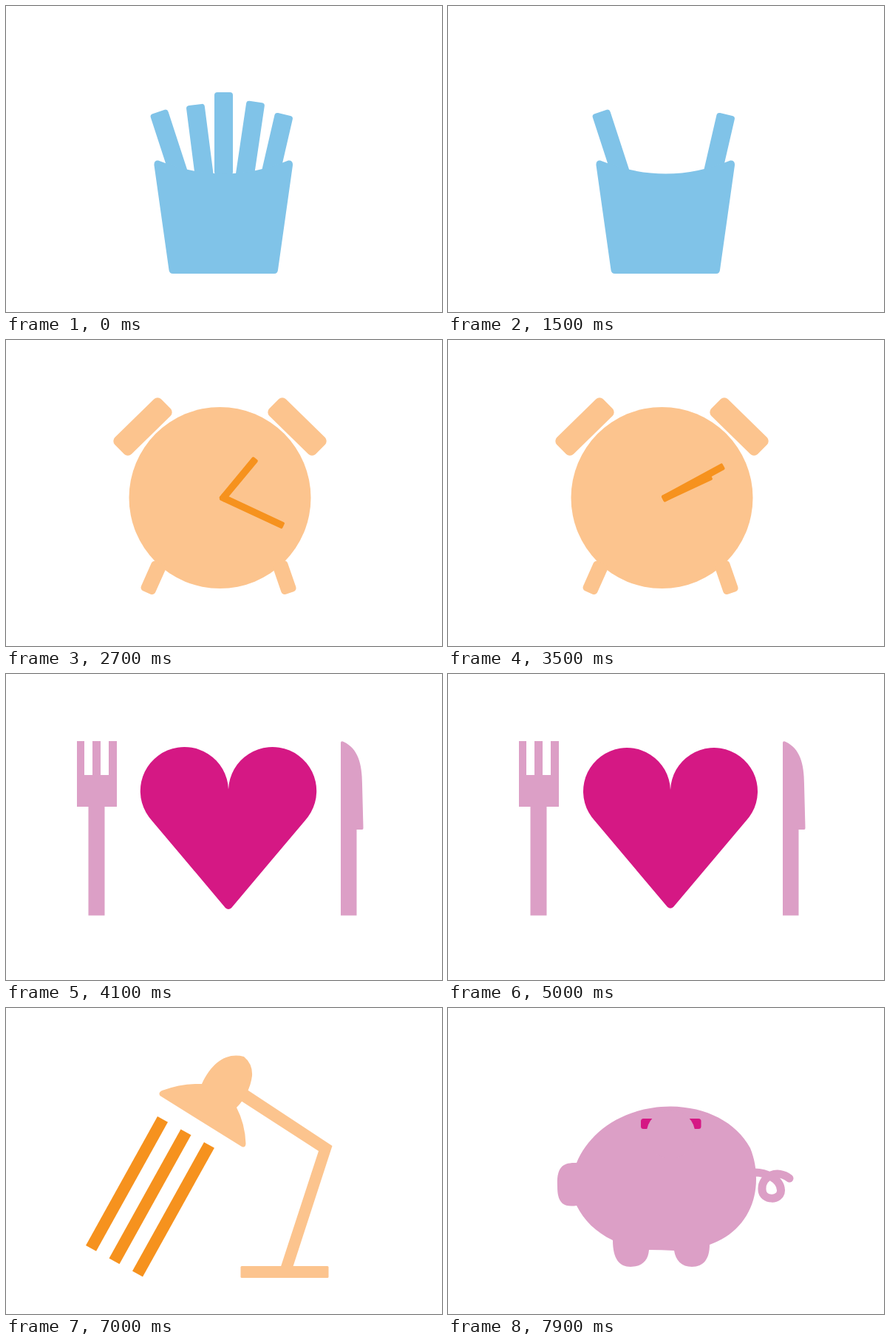
These frames come from a looping animation (590 by 415 pixels, 8000 ms). An HTML page:

```html
<!DOCTYPE html>
<html lang="en">
<head>
<meta charset="utf-8">
<title>Icons</title>
<style>
  html, body { margin: 0; width: 100%; height: 100%; overflow: hidden; background: #fff; }
  svg { display: block; width: 100%; height: 100%; }
  .blue { fill: #80c3e8; }
  .peach { fill: #fcc48e; }
  .orange { fill: #f6921e; }
  .pink { fill: #dc9fc6; }
  .magenta { fill: #d51884; }
</style>
</head>
<body>
<svg viewBox="0 0 590 415">
  <g id="fries" class="blue">
    <g id="sticks"></g>
    <path d="M200.5 216Q200 209 206 209.500Q295 245.500 382 209.500Q388.500 209 388 216L368 358Q367.500 363 363 363H226Q221 363 220.500 358Z"/>
  </g>

  <g id="clock" class="peach">
    <circle cx="289.500" cy="214" r="123"/>
    <rect x="-44" y="-16" width="88" height="32" rx="7" transform="translate(185 117.500) rotate(-44.500)"/>
    <rect x="-44" y="-16" width="88" height="32" rx="7" transform="translate(394 117.500) rotate(44.500)"/>
    <rect x="-10.500" y="-44" width="21" height="44" rx="5" transform="translate(190.500 342.500) rotate(24)"/>
    <rect x="-10.500" y="-44" width="21" height="44" rx="5" transform="translate(384 343) rotate(-19)"/>
    <rect id="hour" class="orange" x="-4.750" y="-69" width="9.500" height="73" rx="2"/>
    <rect id="minute" class="orange" x="-4.750" y="-90" width="9.500" height="94" rx="2"/>
  </g>

  <g id="meal" class="pink">
    <path d="M96 91H106V137H117V91H128V137H139V91H150V180H133.500V327.500H111.500V180H96Z"/>
    <path d="M453 93Q453.500 90 457 92C476 101 482 121 482 150L483.500 209Q483.500 211 482 211H474.500V327.500H453Z"/>
    <path id="heart" class="magenta" d="M301 157A59 59 0 1 0 199 199.500L297 316Q301 319.500 305 316L403 199.500A59 59 0 1 0 301 157Z"/>
  </g>

  <g id="lamp" class="peach">
    <path d="M208.500 119Q205.500 115 211 112Q238 102 265 103C279 73 299 60 322 66Q334 76 333 92C331 108 323 124 312 135Q323.500 157 324.500 184Q324 190 319 188Z"/>
    <path d="M325 110L441.500 187L388 352H371.500L423 194L315 124Z"/>
    <rect x="317.500" y="350" width="119" height="16" rx="1.500"/>
    <g id="rays" class="orange" transform="translate(205 147) rotate(29)">
      <rect width="16" height="200"/>
      <rect x="36" width="16" height="200"/>
      <rect x="72" width="16" height="200"/>
    </g>
  </g>

  <g id="pig" class="pink">
    <path d="M301 133.500C350 134 390 155 409 190C415 205 417 218 417 232C417 275 392 308 354 321C354 340 346 351 330 351C316 351 308 342 306 329Q289 328 272 328C271 342 263 351 247 351C232 351 223 340 223 315C200 304 184 288 174 268C154 271 148 262 148 242C147 218 153 209 174 210C190 170 235 134 301 133.500Z"/>
    <path d="M412 223C430 222 450 232 450.500 247C451 262 425 262 425 246C424 228 446 218 462 231" fill="none" stroke="#dc9fc6" stroke-width="11" stroke-linecap="round"/>
    <rect class="magenta" x="261" y="150" width="81.500" height="14" rx="3.500"/>
    <circle id="coin" cx="301.500" r="33"/>
  </g>
</svg>
<script>
const LOOP = 8000, STEP = 100, FADE = 300;
const $ = id => document.getElementById(id);
const clamp = v => Math.min(1, Math.max(0, v));
const fade = (t, start) => { const k = clamp((t - start) / FADE); return k * (2 - k); };
const show = (el, a) => {
  el.setAttribute('opacity', a);
  el.style.display = a > 0 ? '' : 'none';
};

// x, y of the top, tilt, start of fade-out
const sticks = [
  [206.5, 143.5, -18], [256, 134, -7.3, 800], [294.5, 117, 0, 1200],
  [338, 130, 8.4, 300], [376.5, 147, 13]
].map(([x, y, tilt, out]) => {
  const el = document.createElementNS('http://www.w3.org/2000/svg', 'rect');
  const attrs = { x: -12.5, width: 25, height: 112, rx: 4, transform: `translate(${x} ${y}) rotate(${tilt})` };
  for (const key in attrs) el.setAttribute(key, attrs[key]);
  $('sticks').append(el);
  return { el, out };
});

const scenes = [['fries', -FADE], ['clock', 1800], ['meal', 3600], ['lamp', 5400], ['pig', 7300]];

// speeds up to a steady spin
function minuteAngle(t) {
  const s = Math.max(0, t - 2100);
  return s < 600 ? 115 * (s / 600) ** 2 : 115 + 0.383 * (s - 600);
}

function draw(t) {
  scenes.forEach(([id, start], i) => {
    const next = scenes[i + 1];
    show($(id), fade(t, start) * (next ? 1 - fade(t, next[1]) : 1));
  });

  for (const { el, out } of sticks) if (out) show(el, 1 - fade(t, out));

  const angle = minuteAngle(t);
  $('minute').setAttribute('transform', `translate(294 214) rotate(${angle})`);
  $('hour').setAttribute('transform', `translate(294 214) rotate(${30 + angle / 12})`);

  const beat = 1 + 0.039 * (1 - Math.cos((t - 3980) / 1000 * 2 * Math.PI));
  $('heart').setAttribute('transform', `translate(301 209) scale(${beat}) translate(-301 -209)`);

  show($('rays'), fade(t, 6400));

  $('coin').setAttribute('cy', 89 + 82 * clamp((t - 7500) / 400) ** 2);
}

const begin = performance.now();
function tick() {
  const t = (performance.now() - begin) % LOOP;
  draw(Math.floor(t / STEP) * STEP);
  requestAnimationFrame(tick);
}
tick();
</script>
</body>
</html>
```
